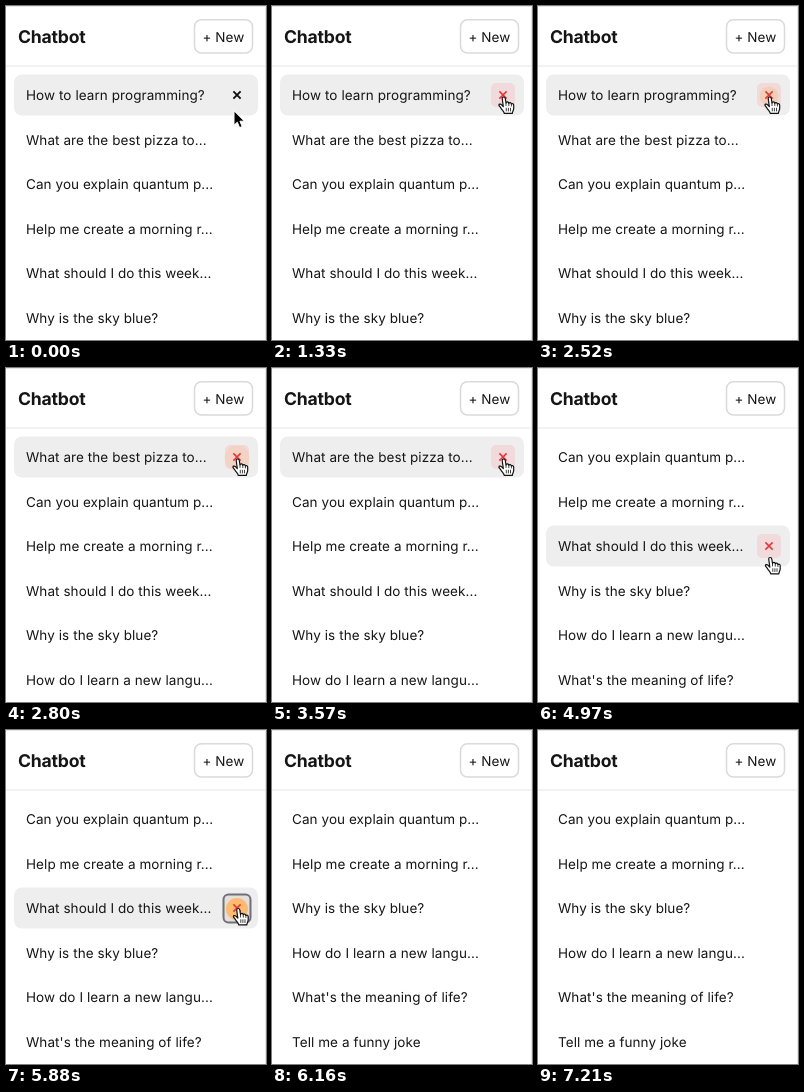
Animation, 260 px wide and 334 px high, one loop 7.98 s. Source, as an HTML page:

```html
<!DOCTYPE html>
<html lang="en">
<head>
<meta charset="utf-8">
<title>Chat list</title>
<style>
  html, body { margin: 0; width: 100%; height: 100%; overflow: hidden; background: #fff; }
  svg { display: block; width: 260px; height: 334px; font-family: Inter, "Open Sans", sans-serif; }
  text { fill: #151515; font-size: 13.5px; letter-spacing: 0.07px; text-rendering: geometricPrecision; }
  .title { font-size: 17.6px; font-weight: 650; letter-spacing: -0.2px; }
  .line { stroke: #e6e6e6; }
</style>
</head>
<body>
<svg viewBox="0 0 260 334">
  <path class="line" d="M0 .5H259.5V334M0 60H259" fill="none"/>
  <text class="title" x="12" y="37">Chatbot</text>
  <rect x="188.5" y="13.7" width="58" height="33.3" rx="7" fill="#fff" stroke="#dadada" stroke-width="1.5"/>
  <text x="196.5" y="36">+ New</text>

  <g id="hover">
    <rect x="8" y="-20.5" width="244" height="41" rx="8" fill="#eee"/>
    <rect id="button" x="219" y="-12" width="24" height="24" rx="5" fill="#f1dadb"/>
    <rect id="ring" x="217.5" y="-13.5" width="27" height="28" rx="5" fill="#e5dedb" stroke="#6d7179" stroke-width="2"/>
    <circle id="glow" cx="231" cy="1" fill="#fbbb70"/>
    <path id="cross" d="M227.4 -3.6l7.2 7.2m0 -7.2l-7.2 7.2" fill="none"/>
  </g>
  <g id="list"></g>

  <g id="cursor" stroke-linejoin="round" stroke-linecap="round">
    <path id="arrow" d="M0 0V14.2L3.3 11.2L5.6 16.6L8.2 15.5L5.9 10.2H10.2Z" fill="#000" stroke="#fff"/>
    <g id="hand" fill="#fff" stroke="#111" stroke-width="1.2">
      <path d="M-1.8 1.5C-1.8 -.5 1.1 -.5 1.3 1.5L2 6C2.4 4.5 4.6 4.6 4.8 6.3C5.4 5.1 7.2 5.4 7.4 7C8.2 6.1 9.7 6.7 9.7 8.2V11.3C9.7 13.2 8.7 14 8.3 16.4H.3C0 14.4 -1.8 13.2 -3 11.2L-4.9 8.7C-5.6 7.2 -3.7 6.5 -2.6 7.6L-.7 9.5Z"/>
      <path d="M2 6V8.5M4.8 6.3V8.7M7.4 7V9M2.3 11.2V14M4.4 11.2V14M6.5 11.2V14" stroke-width=".8"/>
    </g>
  </g>
</svg>
<script>
const LOOP = 7980, STEP = 70;
const ROW = 44.5, FIRST = 89;
const chats = [
  "How to learn programming?", "What are the best pizza to...",
  "Can you explain quantum p...", "Help me create a morning r...",
  "What should I do this week...", "Why is the sky blue?",
  "How do I learn a new langu...", "What's the meaning of life?",
  "Tell me a funny joke"
];
const clicks = [
  { time: 2520, chat: 0 }, { time: 4060, chat: 1 }, { time: 5740, chat: 4 }
];
const RELEASE = 280, FADE_END = 560, LEAVE = 6090;

// time, x, y of the pointer tip
const path = [
  [0, 228, 105], [70, 228, 105], [490, 232, 91], [4410, 232, 91],
  [4830, 232.5, 189.5], [5110, 232.5, 189.5], [5460, 232.5, 178.5], [LOOP, 232.5, 178.5]
];

const el = id => document.getElementById(id);
const show = (id, on) => el(id).style.display = on ? "" : "none";
const clamp = v => Math.max(0, Math.min(1, v));
const ease = p => p * p * (3 - 2 * p);

const labels = chats.map(chat => {
  const label = document.createElementNS("http://www.w3.org/2000/svg", "text");
  label.textContent = chat;
  label.setAttribute("x", 20);
  return el("list").appendChild(label);
});

function pointerAt(t) {
  const i = path.findIndex(([end]) => t < end);
  const [t0, x0, y0] = path[i - 1], [t1, x1, y1] = path[i];
  const p = ease((t - t0) / (t1 - t0));
  return { x: x0 + (x1 - x0) * p, y: y0 + (y1 - y0) * p };
}

function glowAt(age) {
  if (age < RELEASE) return clamp((age + STEP) / 210);
  return 0.22 * clamp((FADE_END - age) / (FADE_END - RELEASE));
}

function render(t) {
  const removed = clicks.filter(c => t >= c.time + RELEASE).map(c => c.chat);
  let row = 0;
  labels.forEach((label, i) => {
    const gone = removed.includes(i);
    label.style.display = gone ? "none" : "";
    if (!gone) label.setAttribute("y", FIRST + ROW * row++ + 5);
  });

  const present = t < LEAVE;
  show("cursor", present);
  show("hover", present);
  if (!present) return;

  const { x, y } = pointerAt(t);
  const center = FIRST + ROW * Math.round((y - FIRST) / ROW);
  const onButton = Math.abs(y - center) < 13;
  const click = clicks.find(c => t >= c.time && t < c.time + FADE_END);
  const age = click ? t - click.time : FADE_END;

  el("hover").setAttribute("transform", `translate(0 ${center})`);
  el("cursor").setAttribute("transform", `translate(${x} ${y})`);
  show("arrow", !onButton);
  show("hand", onButton);
  show("button", onButton);
  show("ring", age >= STEP && age < RELEASE);
  el("glow").setAttribute("opacity", glowAt(age));
  el("glow").setAttribute("r", 9.5 + 3 * clamp(age / RELEASE));
  el("cross").setAttribute("stroke", onButton ? "#e5383b" : "#111");
  el("cross").setAttribute("stroke-width", onButton ? 1.6 : 1.9);
}

const start = performance.now();
function tick() {
  const t = (performance.now() - start) % LOOP;
  render(Math.floor(t / STEP) * STEP);
  requestAnimationFrame(tick);
}
render(0);
requestAnimationFrame(tick);
</script>
</body>
</html>
```
